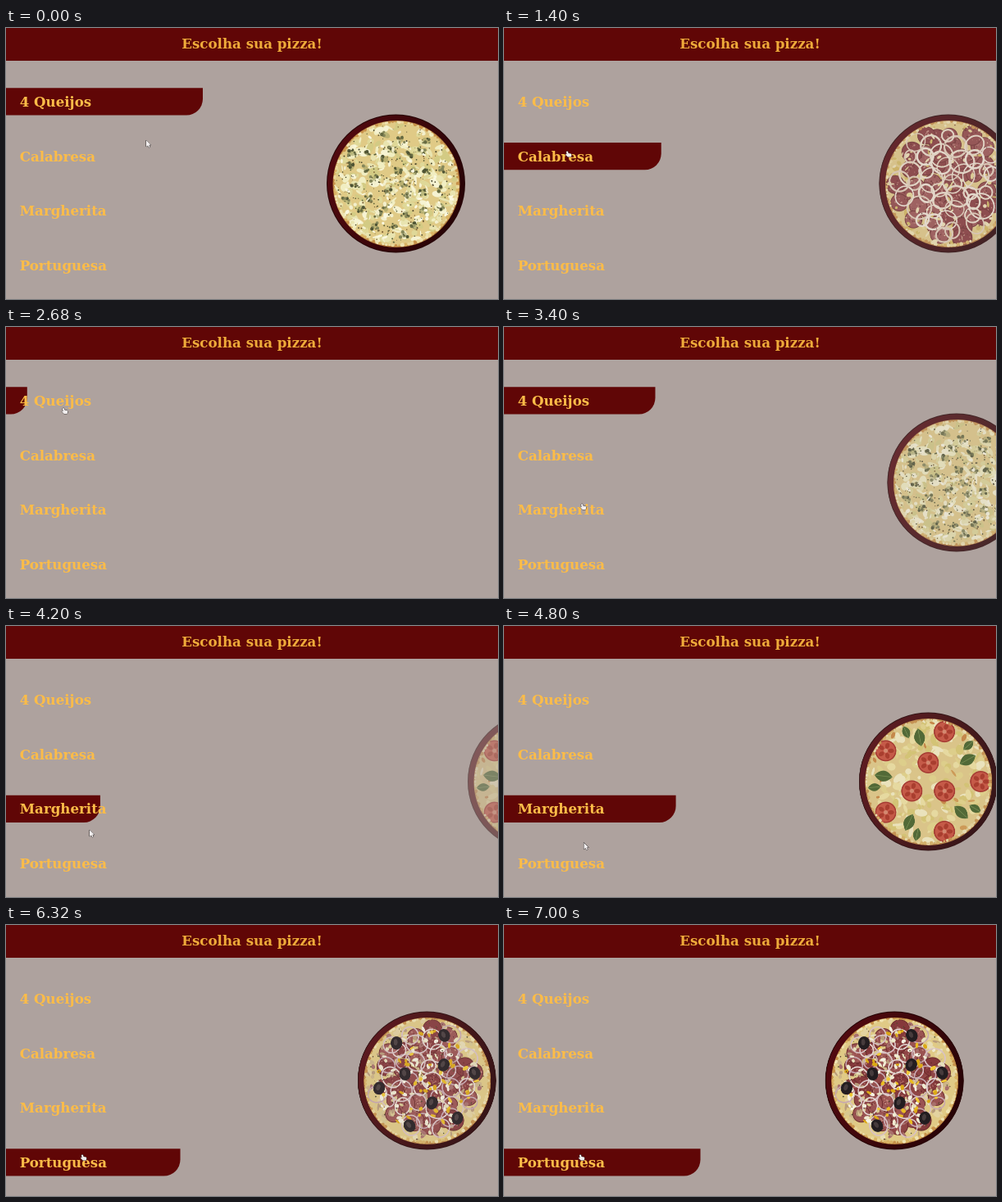
An HTML page with a canvas for the animation above (7.08 s loop, 600 px wide and 331 px high).

```html
<!DOCTYPE html>
<html lang="pt">
<head>
<meta charset="utf-8">
<title>Escolha sua pizza!</title>
<style>
  html, body { margin: 0; height: 100%; overflow: hidden; background: #aea29e; }
  canvas { display: block; width: 600px; height: 331px; }
</style>
</head>
<body>
<canvas id="stage" width="600" height="331"></canvas>
<script>
const LOOP = 7080, SLIDE = 2000, MOVE = 320, TAU = Math.PI * 2;
const ctx = document.getElementById('stage').getContext('2d');
const items = ['4 Queijos', 'Calabresa', 'Margherita', 'Portuguesa'];
const barTop = n => 73.3 + n * 66.67;

// [time, chosen item]
const choices = [[-SLIDE, 0], [408, 1], [2465, 0], [3635, 2], [5120, 3]];

// [start of move, x, y of the pointer tip afterwards]
const moves = [[-MOVE, 171, 137], [60, 77, 150], [1560, 70, 98.5], [2800, 95, 215.5], [3830, 102, 249], [4640, 93, 280]];

// The CSS "ease" curve
function ease(x) {
  if (x >= 1) return 1;
  const bezier = (u, a, b) => 3 * (1 - u) ** 2 * u * a + 3 * (1 - u) * u * u * b + u ** 3;
  let lo = 0, hi = 1;
  for (let i = 0; i < 24; i++) {
    const mid = (lo + hi) / 2;
    if (bezier(mid, .25, .25) < x) lo = mid; else hi = mid;
  }
  return bezier(lo, .1, 1);
}

// Seeded random numbers (mulberry32)
let seed;
function rnd(a = 0, b = 1) {
  seed = (seed + 0x6D2B79F5) | 0;
  let r = Math.imul(seed ^ (seed >>> 15), 1 | seed);
  r = (r + Math.imul(r ^ (r >>> 7), 61 | r)) ^ r;
  return a + (b - a) * ((r ^ (r >>> 14)) >>> 0) / 4294967296;
}
const pick = list => list[Math.floor(rnd(0, list.length))];

// Placement rules around the centre 0,0
const polar = (r, a, draw) => draw(r * Math.cos(a), r * Math.sin(a), a);
function scatter(n, radius, draw) {
  for (let i = 0; i < n; i++) polar(radius * Math.sqrt(rnd()), rnd(0, TAU), draw);
}
function spread(n, radius, draw) {
  for (let i = 0; i < n; i++)
    polar(radius * Math.sqrt((i + .5) / n) + rnd(-3, 3), i * 2.39996 + rnd(-.15, .15), draw);
}
function around(n, radius, degrees, draw) {
  for (let i = 0; i < n; i++) polar(radius, degrees * TAU / 360 + i / n * TAU, draw);
}

// Ingredients
let g;
function oval(x, y, rx, ry, color, turn = 0) {
  g.fillStyle = color;
  g.beginPath();
  g.ellipse(x, y, rx, ry, turn, 0, TAU);
  g.fill();
}
const disc = (x, y, r, color) => oval(x, y, r, r, color);
const blobs = (n, radius, min, max, colors) => scatter(n, radius, (x, y) =>
  oval(x, y, rnd(min, max), rnd(min, max) * .6, pick(colors), rnd(0, TAU)));
const specks = (n, size, colors) => scatter(n, 73, (x, y) => disc(x, y, rnd(.4, size), pick(colors)));

function onion(x, y, r, colors, width) {
  g.strokeStyle = pick(colors);
  g.lineWidth = width;
  g.beginPath();
  g.ellipse(x, y, r, r * rnd(.8, 1), rnd(0, TAU), 0, TAU);
  g.stroke();
}
function salami(x, y) {
  const r = rnd(10, 13);
  disc(x, y, r, '#6a2b2c');
  disc(x, y, r - .9, pick(['#8f4545', '#85393b', '#9a5352']));
  for (let i = 0; i < 18; i++)
    polar(rnd(0, r - 2), rnd(0, TAU), (dx, dy) =>
      disc(x + dx, y + dy, rnd(.4, 1.2), pick(['#bd8478', '#6f2e30', '#a9645f'])));
}
function tomato(x, y) {
  disc(x, y, 13, '#a52e25');
  disc(x, y, 11.5, '#c8503c');
  for (let a = 0; a < TAU; a += TAU / 5)
    oval(x + 6.5 * Math.cos(a), y + 6.5 * Math.sin(a), 3.6, 2.6, '#a8301f', a);
  disc(x, y, 2.5, '#d9866a');
}
const leaf = size => (x, y, a) => {
  g.save();
  g.translate(x, y);
  g.rotate(a);
  g.fillStyle = '#456229';
  g.strokeStyle = '#6f8a48';
  g.lineWidth = .8;
  g.beginPath();
  g.moveTo(-size, 0);
  g.quadraticCurveTo(0, -size * 1.2, size, 0);
  g.quadraticCurveTo(0, size * 1.2, -size, 0);
  g.fill();
  g.beginPath();
  g.moveTo(-size, 0);
  g.lineTo(size, 0);
  g.stroke();
  g.restore();
};
function olive(x, y) {
  const turn = rnd(-.6, .6);
  oval(x, y, 7, 8, '#231d20', turn);
  oval(x - 1, y - 1, 2.5, 4, '#463b3c', turn);
}

const toppings = [
  () => {
    blobs(260, 74, 2, 8, ['#f1eec2', '#e9e4b0', '#dfd898', '#f6f3d2', '#d3cb84']);
    spread(34, 66, (x, y) => {
      oval(x, y, rnd(3, 6), rnd(2, 4), '#9c9c6090', rnd(0, TAU));
      for (let i = 0; i < 6; i++)
        disc(x + rnd(-5, 5), y + rnd(-4, 4), rnd(.7, 2.2), pick(['#676b42', '#85875a', '#4f5434']));
    });
    blobs(110, 72, 1, 4, ['#faf8e0', '#f3efcc']);
    specks(300, 1, ['#45422a', '#75572c', '#596038']);
  },
  () => {
    blobs(80, 74, 2, 7, ['#e6d48a', '#d4b75c', '#efe4b0']);
    spread(46, 68, salami);
    blobs(70, 74, 1, 4.5, ['#e6d894', '#d2bb62', '#eee2b4']);
    spread(42, 62, (x, y) => onion(x, y, rnd(7, 16), ['#ecdfcb', '#e2cfba', '#f0e6d6'], rnd(1.4, 2.6)));
    specks(90, .9, ['#5a2c26', '#e8d9a8']);
  },
  () => {
    blobs(220, 74, 2, 8, ['#eee2a0', '#e4d588', '#f3ecc0', '#d9c870']);
    blobs(16, 74, 2, 5, ['#c9853f', '#d29a4e']);
    around(5, 64, 144, tomato);
    around(3, 23, 30, tomato);
    around(5, 55, 187, leaf(11));
    around(5, 66, 174, leaf(8));
  },
  () => {
    blobs(100, 74, 2, 7, ['#e3d2a0', '#cdb588', '#e8ddb4']);
    spread(38, 62, salami);
    blobs(120, 72, 1.5, 5, ['#d8c890', '#b99c7a', '#a8706c']);
    spread(34, 64, (x, y) => onion(x, y, rnd(8, 14), ['#d9c2c4', '#c7a8b0', '#e6d8d4'], 1.6));
    blobs(80, 64, 2, 4, ['#f0ebd2', '#e6dfbc', '#f6f2e2']);
    blobs(50, 62, 2, 4, ['#eabc22', '#f0c935', '#dca916']);
    specks(110, .9, ['#4a4c2c', '#5b3d30']);
    around(6, 59, 171, olive);
    around(3, 28, 197, olive);
  }
];

// Each pizza is drawn once, at double size
const pizzas = toppings.map((addToppings, i) => {
  const tile = document.createElement('canvas');
  tile.width = tile.height = 344;
  g = tile.getContext('2d');
  g.scale(2, 2);
  g.translate(86, 86);
  seed = 11 + i;
  const rim = g.createLinearGradient(-80, -30, 80, 40);
  rim.addColorStop(0, '#520a10');
  rim.addColorStop(.5, '#3c070b');
  rim.addColorStop(1, '#260306');
  disc(0, 0, 84.5, '#240305');
  disc(0, 0, 83.5, rim);
  disc(.5, .5, 77.5, '#b88040');
  disc(.5, .5, 76, '#e0ca86');
  g.beginPath();
  g.arc(.5, .5, 77, 0, TAU);
  g.clip();
  addToppings();
  around(120, 75.5, 0, (x, y) =>
    disc(x, y, rnd(.8, 2.6), pick(['#d9b364', '#e9d79a', '#c8924a', '#efe3b2'])));
  return tile;
});

const arrow = new Path2D('M0 0V8L2 6.4L3.3 9L4.6 8.4L3.4 5.8H5.8Z');
const hand = new Path2D('M-1 1.2Q0-.2 1 1L1.5 3L4.4 3.6Q5.4 4 5.2 5.2L4.6 7.4H.8L-2 4.8Q-1.6 3.6-.4 4.4Z');

function drawPointer(t) {
  const i = moves.findLastIndex(m => m[0] <= t);
  const [start, x1, y1] = moves[i], [, x0, y0] = moves[Math.max(i - 1, 0)];
  const k = Math.min((t - start) / MOVE, 1), s = k * k * (3 - 2 * k);
  const x = x0 + (x1 - x0) * s, y = y0 + (y1 - y0) * s;
  const overItem = x < 124 && items.some((_, n) => Math.abs(y - barTop(n) - 16.7) < 16.7);
  const shape = overItem ? hand : arrow;
  ctx.save();
  ctx.translate(x, y);
  ctx.lineJoin = 'round';
  ctx.strokeStyle = '#2c2828';
  ctx.fillStyle = '#f2eeee';
  ctx.stroke(shape);
  ctx.fill(shape);
  ctx.restore();
}

function draw(t) {
  ctx.fillStyle = '#aea29e';
  ctx.fillRect(0, 0, 600, 331);
  ctx.fillStyle = '#600606';
  ctx.fillRect(0, 0, 600, 40);

  const [start, chosen] = choices.findLast(c => c[0] <= t);
  const p = ease((t - start) / SLIDE);
  if (p > 0) {
    ctx.beginPath();
    ctx.roundRect(0, barTop(chosen), 240 * p, 33.3, [0, 0, 20, 0]);
    ctx.fill();
    ctx.globalAlpha = p;
    ctx.drawImage(pizzas[chosen], 389.5 + 330 * (1 - p), 104, 172, 172);
    ctx.globalAlpha = 1;
  }

  ctx.font = 'bold 16.67px "DejaVu Serif", "Noto Serif", serif';
  ctx.textAlign = 'center';
  ctx.fillStyle = '#eeab3a';
  ctx.fillText('Escolha sua pizza!', 300, 25.3);
  ctx.textAlign = 'left';
  ctx.fillStyle = '#fcbc48';
  items.forEach((name, n) => ctx.fillText(name, 16.67, barTop(n) + 22.7));
  drawPointer(t);
}

const began = performance.now();
function tick() {
  draw((performance.now() - began) % LOOP);
  requestAnimationFrame(tick);
}
tick();
</script>
</body>
</html>
```
